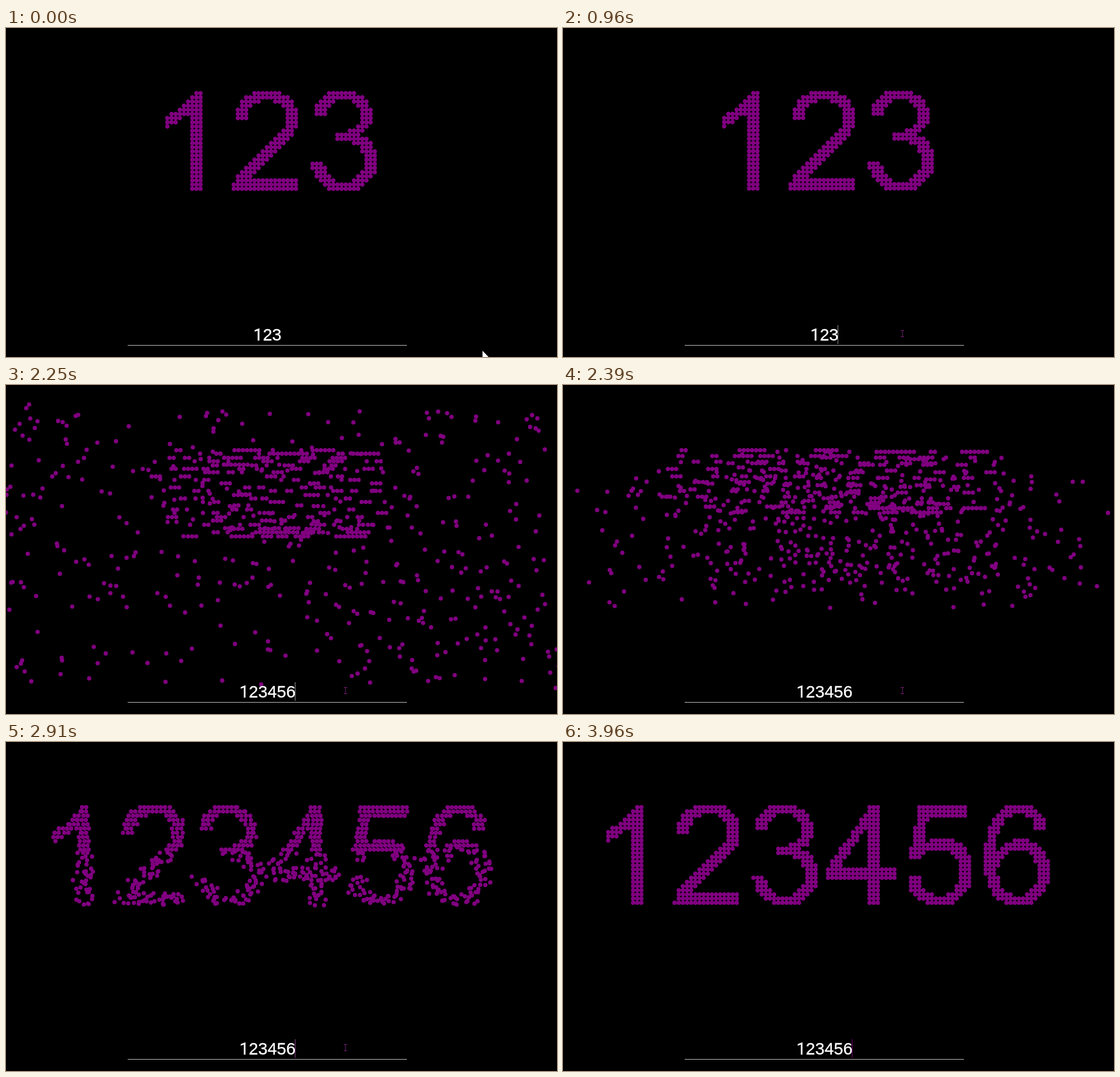
Animation, 969 px wide and 578 px high, one loop 4.37 s. Source, as an HTML page with a canvas:

```html
<!DOCTYPE html>
<html lang="en">
<head>
<meta charset="utf-8">
<title>Dot digits</title>
<style>
  html, body { margin: 0; width: 100%; height: 100%; overflow: hidden; background: #000; }
  canvas, svg { position: absolute; left: 0; top: 0; display: block; }
  text {
    font: 29.5px "Liberation Sans", Arial, sans-serif;
    fill: #fff; stroke: #fff; stroke-width: .35px; text-anchor: middle;
  }
  .one { font-family: Roboto, sans-serif; }
</style>
</head>
<body>
<canvas id="dots" width="969" height="578"></canvas>
<svg width="969" height="578" viewBox="0 0 969 578">
  <rect x="214" y="557" width="491" height="1" fill="#c4c4c4"/>
  <text x="459.8" y="549"><tspan class="one">1</tspan><tspan id="rest">23</tspan></text>
  <rect id="caret" y="522" width="1" height="33"/>
  <path id="arrow" d="M0 0V16L3.7 12.6L6.2 18.4L8.6 17.3L6.2 11.7H11.3Z" fill="#fff"/>
  <path id="beam" d="M-3 -5.5H3M0 -5.5V5.5M-3 5.5H3" fill="none" stroke="#7a1f7a"/>
</svg>
<script>
const LOOP = 4370, STEP = 65.7;
const STARTS = [0, 70, 600, 1240, 1650, 2250, 2790, 3350, 3960];
const MORPH = 2218, RATE = 0.0059;
const PITCH = 7.295, RADIUS = 3.8;
const SCALE = 244 / 2048, ADVANCE = 1139 * SCALE, BASE = 284.4, CENTER = 459.7;

// Digit outlines in font units, y up.
const GLYPHS = {
  1: 'M763 0H583V1147Q518 1085 412 1023T223 930V1104Q374 1175 487 1276T647 1472H763Z',
  2: 'M1031 173V0H62Q60 65 83 125Q120 224 201 320T437 542Q676 738 760 853T844 1069Q844 1176 768 1249T568 1323Q438 1323 360 1245T281 1029L96 1048Q115 1255 239 1363T572 1472Q783 1472 906 1355T1029 1065Q1029 977 993 892T873 713T596 455Q457 338 417 297T312 173Z',
  3: 'M86 387L266 411Q297 258 371 190T553 123Q680 123 767 211T855 429Q855 553 774 633T568 714Q517 714 441 694L461 852Q605 851 700 911T793 1096Q793 1196 725 1262T550 1328Q444 1328 373 1261T282 1063L102 1095Q132 1275 248 1373T546 1472Q671 1472 771 1420T924 1280T977 1096Q977 995 926 920T774 800Q905 770 978 674T1051 435Q1051 242 910 108T553 -26Q359 -26 231 89T86 387Z',
  4: 'M662 0V351H26V516L695 1466H842V516H1040V351H842V0ZM662 516V1177L203 516Z',
  5: 'M85 384L274 400Q295 262 371 192T556 123Q686 123 776 221T866 481Q866 635 779 724T553 813Q466 813 396 773T286 671L117 693L259 1446H988V1274H403L324 880Q456 972 601 972Q793 972 925 839T1057 497Q1057 298 941 153Q800 -25 556 -25Q356 -25 229 87T85 384Z',
  6: 'M1019 1107L840 1093Q816 1199 772 1247Q699 1324 592 1324Q506 1324 441 1276Q356 1214 307 1095T256 756Q321 855 415 903T612 951Q792 951 918 818T1045 476Q1045 338 985 219T822 38T586 -25Q365 -25 225 137T86 673Q86 1090 240 1279Q374 1472 601 1472Q770 1472 878 1377T1019 1107ZM284 475Q284 382 323 297T434 167T583 123Q697 123 779 215T861 465Q861 617 780 704T576 792Q453 792 368 704T284 475Z'
};

const $ = id => document.getElementById(id);
const ctx = $('dots').getContext('2d');
const rest = $('rest'), caret = $('caret'), arrow = $('arrow'), beam = $('beam');
const show = (el, on) => el.setAttribute('visibility', on ? 'visible' : 'hidden');

let seed = 7;
function random() {
  seed = (seed * 16807) % 2147483647;
  return seed / 2147483647;
}

// Grid points covered by a centred string, row by row.
function layout(str) {
  const paths = [...str].map(c => new Path2D(GLYPHS[c]));
  const left = CENTER - str.length * ADVANCE / 2;
  const points = [];
  for (let row = 0; row < 24; row++) {
    const y = 114.6 + row * PITCH;
    for (let x = 6.55; x < 969; x += PITCH) {
      const k = Math.floor((x - left) / ADVANCE);
      if (!paths[k]) continue;
      const u = (x - left - k * ADVANCE) / SCALE;
      if (ctx.isPointInPath(paths[k], u, (BASE - y) / SCALE, 'evenodd')) points.push({ x, y });
    }
  }
  return points;
}

const before = layout('123');
const after = layout('123456');
// Existing dots are reused in order; the extra ones appear anywhere.
const from = after.map((p, i) => before[i] || { x: -230 + 1380 * random(), y: 590 * random() });

function snap(t) {
  const s = STARTS.filter(a => a <= t).pop();
  return s + Math.floor((t - s + 12) / STEP) * STEP;
}

const PATH = [[70, 838, 567], [420, 592, 527], [480, 592, 527], [650, 597, 537],
  [3120, 597, 537], [3400, 790, 600]];

function pointer(t) {
  const i = PATH.findIndex(k => k[0] > t);
  const b = PATH.at(i), a = i > 0 ? PATH[i - 1] : b;
  const f = a === b ? 0 : (t - a[0]) / (b[0] - a[0]);
  return { x: a[1] + (b[1] - a[1]) * f, y: a[2] + (b[2] - a[2]) * f };
}

// Push builds up while the pointer moves, then eases off.
function push(t, start, end, peak) {
  if (t < start) return 0;
  const rise = peak * (1 - Math.exp(-RATE * (Math.min(t, end) - start)));
  return rise * Math.exp(-RATE * Math.max(0, t - end));
}

function drawDots(t, mouse) {
  const force = push(t, 50, 535, 1980) * (t < 1200) + push(t, 3250, 3440, 1450) * (t < 3900);
  const left = Math.exp(-RATE * (t - MORPH));
  const points = t < MORPH ? before : after;
  ctx.clearRect(0, 0, 969, 578);
  ctx.fillStyle = 'purple';
  ctx.beginPath();
  points.forEach((p, i) => {
    let { x, y } = p;
    if (points === after) {
      x += (from[i].x - x) * left;
      y += (from[i].y - y) * left;
    }
    const dx = x - mouse.x, dy = y - mouse.y;
    const k = force / (dx * dx + dy * dy + 1);
    x += dx * k;
    y += dy * k;
    ctx.moveTo(x + RADIUS, y);
    ctx.arc(x, y, RADIUS, 0, 2 * Math.PI);
  });
  ctx.fill();
}

function drawInput(t, mouse) {
  const count = 3 + (t >= 1650) + (t >= 1715) + (t >= 1780);
  const value = '23456'.slice(0, count - 1);
  if (rest.textContent !== value) rest.textContent = value;

  const blink = t < 1780 || Math.floor((t - 1780) / 543) % 2 === 0;
  show(caret, t >= 1650 ? blink : t >= 710 && t < 1240);
  caret.setAttribute('x', Math.round(458.3 + count * 8.3));
  caret.setAttribute('fill', t < 2500 ? '#999' : t < 3600 ? '#8c4a8c' : 'purple');

  const inside = Math.abs(mouse.x - 459.5) < 246 && mouse.y > 518 && mouse.y < 558;
  show(beam, inside);
  show(arrow, !inside);
  (inside ? beam : arrow).setAttribute('transform', `translate(${mouse.x} ${mouse.y})`);
}

const origin = performance.now();
function frame() {
  const t = snap(Math.max(0, performance.now() - origin) % LOOP);
  const mouse = pointer(t);
  drawDots(t, mouse);
  drawInput(t, mouse);
  requestAnimationFrame(frame);
}
frame();
</script>
</body>
</html>
```
